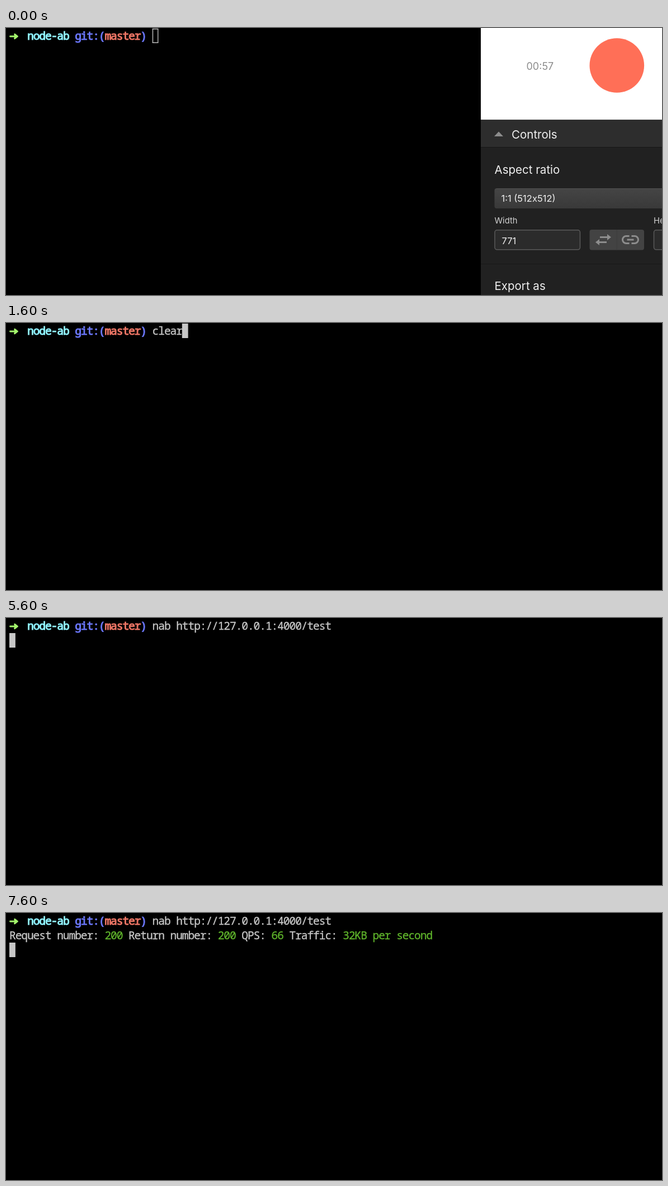
Animation of 1173 by 478 pixels, one loop 8 s. Source, as an HTML page:

```html
<!DOCTYPE html>
<html lang="en">
<head>
<meta charset="utf-8">
<title>Terminal benchmark</title>
<style>
  html, body { margin: 0; width: 100%; height: 100%; overflow: hidden; background: #000; }
  svg { display: block; width: 1173px; height: 478px; }

  /* Terminal: cells of 10.648 x 26 px starting at 6, 1 */
  .term { color: #c7c7c7; }
  .term text {
    font: 19.6px "Noto Sans Mono", "DejaVu Sans Mono", monospace;
    letter-spacing: calc(10.648px - 1ch);
  }
  .term text, .term tspan { fill: currentColor; stroke: currentColor; stroke-width: .35; }
  .term .prompt tspan { stroke-width: 1.1; }
  .term .dir { color: #8ff3ff; }
  .term .git { color: #6b77fb; }
  .term .branch { color: #ec7565; }
  .term .num { color: #5fb42b; }

  /* Recorder panel */
  .panel text { font-family: Inter, "Open Sans", sans-serif; fill: #f0f0f0; }
  .panel .head { font-size: 20.5px; }
  .panel .label { font-size: 14.8px; fill: #d2d2d2; }
  .panel .value { font-size: 16.5px; }
  .field { fill: #2b2b2b; stroke: #5a5a5a; stroke-width: 1.5; }
  .icon { fill: none; stroke: #8d8d8d; stroke-width: 3; }

  .panel, .recall, .command, .result, .cursor, .block {
    animation: 8s step-end infinite;
  }
  .panel { animation-name: panel; }
  .recall { animation-name: recall; }
  .command { animation-name: command; }
  .result { animation-name: result; }
  .cursor { animation-name: move; }
  .block { animation-name: focus; stroke: #c7c7c7; stroke-width: 1.4; }

  @keyframes panel {
    0% { visibility: visible; }
    6.625%, 100% { visibility: hidden; }
  }
  @keyframes recall {
    0% { visibility: hidden; }
    17.5% { visibility: visible; }
    24.125%, 100% { visibility: hidden; }
  }
  @keyframes command {
    0% { visibility: hidden; }
    24.125%, 100% { visibility: visible; }
  }
  @keyframes result {
    0% { visibility: hidden; }
    72.5%, 100% { visibility: visible; }
  }
  @keyframes move {
    0% { transform: translate(261.6px, 1px); }
    17.5% { transform: translate(314.8px, 1px); }
    24.125% { transform: translate(591.6px, 1px); }
    32.5% { transform: translate(6px, 27px); }
    72.5%, 100% { transform: translate(6px, 53px); }
  }
  @keyframes focus {
    0% { fill: #000; }
    0.875%, 100% { fill: #c7c7c7; }
  }
</style>
</head>
<body>
<svg viewBox="0 0 1173 478">
  <defs>
    <linearGradient id="select" x2="0" y2="1">
      <stop stop-color="#454545"/>
      <stop offset="1" stop-color="#393939"/>
    </linearGradient>
  </defs>
  <rect width="1173" height="478"/>

  <g class="term">
    <path d="M7.5 15H18M15.5 11.2L20.5 15L15.5 18.8L17 15Z" fill="#a4f56c" stroke="#a4f56c"
      stroke-width="2.8" stroke-linecap="round" stroke-linejoin="round"/>
    <text class="prompt" x="38" y="21.2"><tspan class="dir">node-ab</tspan> <tspan class="git">git:(<tspan class="branch">master</tspan>)</tspan></text>
    <text class="recall" x="261.6" y="21.2">clear</text>
    <text class="command" x="261.6" y="21.2">nab http://127.0.0.1:4000/test</text>
    <text class="result" x="6" y="47.2">Request number: <tspan class="num">200</tspan> Return number: <tspan class="num">200</tspan> QPS: <tspan class="num">66</tspan> Traffic: <tspan class="num">32KB per second</tspan></text>
    <g class="cursor"><rect class="block" x=".7" y=".7" width="9.4" height="24.6"/></g>
  </g>

  <g class="panel">
    <rect x="849" width="324" height="164.5" fill="#fff"/>
    <text x="930.5" y="74.7" font-size="18" style="fill:#8b8b8b">00:57</text>
    <circle cx="1092.3" cy="67" r="48.8" fill="#ff6f57"/>

    <rect x="849" y="164.5" width="324" height="313.5" fill="#212121"/>
    <rect x="849" y="164.5" width="324" height="48.5" fill="#2d2d2d"/>
    <path d="M849 213.5H1173M849 422.5H1173" stroke="#171717"/>
    <path d="M873 194L881 185.5L889 194Z" fill="#8d8d8d"/>
    <text class="head" x="904" y="197.7">Controls</text>

    <text class="head" x="873.5" y="260.5">Aspect ratio</text>
    <rect x="873.5" y="287" width="310" height="36" rx="4" fill="url(#select)"/>
    <path d="M877 287.5H1173" stroke="#505050"/>
    <text class="value" x="885.5" y="310.5">1:1 (512x512)</text>

    <text class="label" x="873.5" y="350">Width</text>
    <rect class="field" x="874" y="361.8" width="152.5" height="35" rx="4"/>
    <text class="value" x="886.5" y="386.5">771</text>

    <rect x="1043.5" y="361" width="97.5" height="36.5" rx="4" fill="#434343"/>
    <path d="M1092.3 361V397.5" stroke="#3d3d3d"/>
    <path class="icon" d="M1062 374.5H1076M1060 383.5H1074"/>
    <path d="M1075 369L1082 374.5L1075 380ZM1061 378L1054 383.5L1061 389Z" fill="#8d8d8d"/>
    <path class="icon" d="M1114.5 372.5H1109a6.5 6.5 0 0 0 0 13H1114.5M1118.5 372.5H1124a6.5 6.5 0 0 1 0 13H1118.5M1110.5 379H1122.5"/>

    <text class="label" x="1158" y="350">He</text>
    <rect class="field" x="1158.5" y="361.8" width="40" height="35" rx="4"/>
    <text class="head" x="873.5" y="468.5">Export as</text>
  </g>
</svg>
</body>
</html>
```
